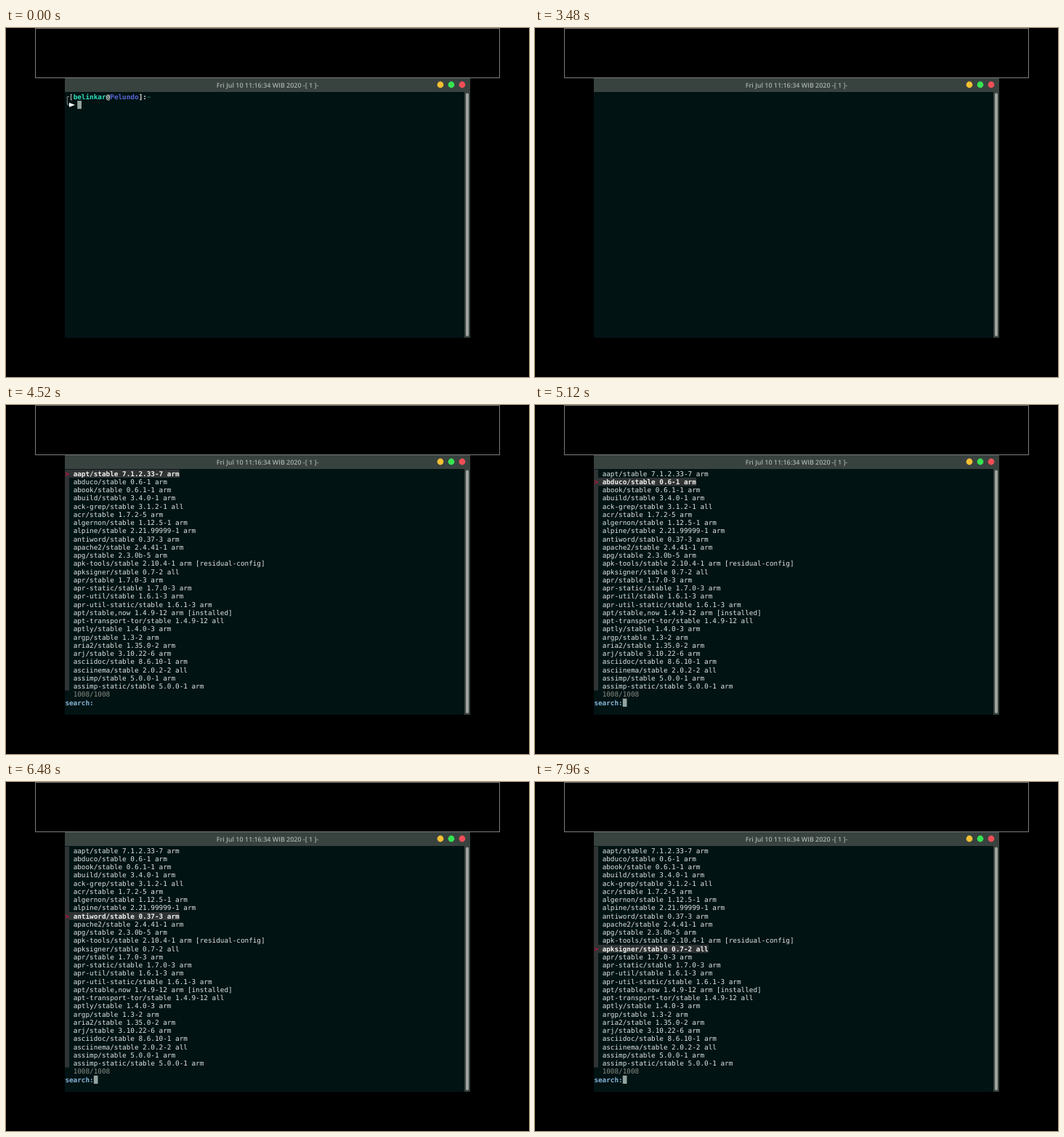
An HTML page for the animation above (8 s loop, 720 by 480 pixels).

```html
<!DOCTYPE html>
<html lang="en">
<head>
<meta charset="utf-8">
<title>Terminal package search</title>
<style>
html, body { margin: 0; width: 100%; height: 100%; overflow: hidden; background: #000; }
svg { display: block; width: 720px; height: 480px; }
text { white-space: pre; text-rendering: geometricPrecision; }
.mono { font: 9.343px "DejaVu Sans Mono", monospace; fill: #dfe5e3; }
.mono .b, .mono.b { font-weight: 700; }
.title { font: 600 8.95px "Open Sans", "Noto Sans", sans-serif; fill: #a9b0ad; }
</style>
</head>
<body>
<svg id="stage" viewBox="0 0 720 480">
  <rect width="720" height="480" fill="#000"/>
  <rect x="81" y="69" width="558" height="357" fill="#021314"/>
  <path d="M81 88V69H639V426H631V88Z" fill="#38423f"/>
  <rect x="633" y="89.500" width="4" height="334.500" rx="2" fill="#a0a3a1"/>
  <text class="title" x="360" y="82" text-anchor="middle">Fri Jul 10 11:16:34 WIB 2020 -[ 1 ]-</text>
  <circle cx="598" cy="78" r="4.400" fill="#f6c034"/>
  <circle cx="613" cy="78" r="4.400" fill="#36e352"/>
  <circle cx="628" cy="78" r="4.400" fill="#f04e57"/>
  <rect x="40.500" y="0.500" width="639" height="68" fill="#000" stroke="#7c7c7c"/>
  <g id="shell"></g>
  <g id="finder"></g>
  <rect id="cursor" width="5.700" height="11.200" fill="#93a49e"/>
</svg>
<script>
const LOOP = 8000, X0 = 81.4, Y0 = 88.8, CW = 5.625, RH = 11.25;
const packages = `aapt/stable 7.1.2.33-7 arm
abduco/stable 0.6-1 arm
abook/stable 0.6.1-1 arm
abuild/stable 3.4.0-1 arm
ack-grep/stable 3.1.2-1 all
acr/stable 1.7.2-5 arm
algernon/stable 1.12.5-1 arm
alpine/stable 2.21.99999-1 arm
antiword/stable 0.37-3 arm
apache2/stable 2.4.41-1 arm
apg/stable 2.3.0b-5 arm
apk-tools/stable 2.10.4-1 arm [residual-config]
apksigner/stable 0.7-2 all
apr/stable 1.7.0-3 arm
apr-static/stable 1.7.0-3 arm
apr-util/stable 1.6.1-3 arm
apr-util-static/stable 1.6.1-3 arm
apt/stable,now 1.4.9-12 arm [installed]
apt-transport-tor/stable 1.4.9-12 all
aptly/stable 1.4.0-3 arm
argp/stable 1.3-2 arm
aria2/stable 1.35.0-2 arm
arj/stable 3.10.22-6 arm
asciidoc/stable 8.6.10-1 arm
asciinema/stable 2.0.2-2 all
assimp/stable 5.0.0-1 arm
assimp-static/stable 5.0.0-1 arm`.split("\n");

const $ = id => document.getElementById(id);
const shell = $("shell"), finder = $("finder"), cursor = $("cursor");
const colX = c => X0 + c * CW;
const rowY = r => Y0 + r * RH;

function add(parent, tag, attrs, content = "") {
  const el = document.createElementNS("http://www.w3.org/2000/svg", tag);
  for (const k in attrs) el.setAttribute(k, attrs[k]);
  el.textContent = content;
  return parent.appendChild(el);
}

function write(parent, col, row, content, color, bold) {
  const el = add(parent, "text", { class: bold ? "mono b" : "mono", x: colX(col), y: rowY(row) + 8.7 }, content);
  if (color) el.style.fill = color;
  return el;
}

// Shell prompt
add(shell, "path", { d: "M87 94.500H84.300V104Q84.300 105.800 86 105.800H88", fill: "none", stroke: "#9ba3a1", "stroke-width": 0.8 });
add(shell, "path", { d: "M87 102.800L95 105.800L87 108.800Z", fill: "#fff" });
write(shell, 1, 0, "[");
write(shell, 2, 0, "belinkar", "#2fe3bd", true);
write(shell, 10, 0, "@", "#eef2f1", true);
write(shell, 11, 0, "Pelundo", "#5a66d6", true);
write(shell, 18, 0, "]:", "#dfe5e3", true);
write(shell, 20, 0, "~", "#237f80");
const typed = write(shell, 3, 1, "");

// Finder list
add(finder, "rect", { x: 81, y: Y0, width: 6, height: 27 * RH, fill: "#2f3334" });
const bar = add(finder, "rect", { x: 87, height: RH, fill: "#2f3334" });
const pointer = write(finder, 0, 0, ">", "#c8103f", true);
const rows = packages.map((p, i) => write(finder, 2, i, p));
const spinner = write(finder, 0, 27, "/", "#b9c43a", true);
const count = write(finder, 2, 27, "", "#8b8d82");
write(finder, 0, 28, "search:", "#87b4d8", true);

// Each entry: start time, value
const commands = [[0, ""], [1640, "."], [1800, "./"]];
const selection = [[0, 0], [5120, 1], [5320, 2], [5560, 3], [5760, 4], [5920, 5], [6080, 6],
  [6240, 7], [6400, 8], [6640, 7], [6800, 6], [6960, 5], [7160, 4], [7360, 3],
  [7480, 4], [7720, 6], [7840, 9], [7960, 12]];
const blink = [[0, 1], [40, 0], [640, 1], [1320, 0], [1640, 1], [2360, 0], [3000, 1],
  [3480, 0], [3960, 1], [4440, 0], [5040, 1]];
const at = (track, t) => track.reduce((v, [start, value]) => t >= start ? value : v, track[0][1]);
const show = (el, on) => el.style.display = on ? "" : "none";

function draw(t) {
  const listed = t >= 3960, loaded = t >= 4360;
  const command = at(commands, t), sel = at(selection, t);
  show(shell, t < 3480);
  show(finder, listed);
  show(cursor, at(blink, t));
  typed.textContent = command;
  cursor.setAttribute("x", colX(listed ? 7 : 3 + command.length));
  cursor.setAttribute("y", rowY(listed ? 28 : 1));

  rows.forEach((row, i) => {
    row.style.fontWeight = i === sel ? 700 : 400;
    row.style.fill = i === sel ? "#f1f2ef" : "";
  });
  bar.setAttribute("y", rowY(sel));
  bar.setAttribute("width", colX(2 + packages[sel].length) - 87);
  pointer.setAttribute("y", rowY(sel) + 8.7);
  show(pointer, loaded);
  show(spinner, !loaded);
  count.textContent = loaded ? "1008/1008" : "770/778";
}

const begin = performance.now();
function tick() {
  draw((performance.now() - begin) % LOOP);
  requestAnimationFrame(tick);
}
tick();
</script>
</body>
</html>
```
